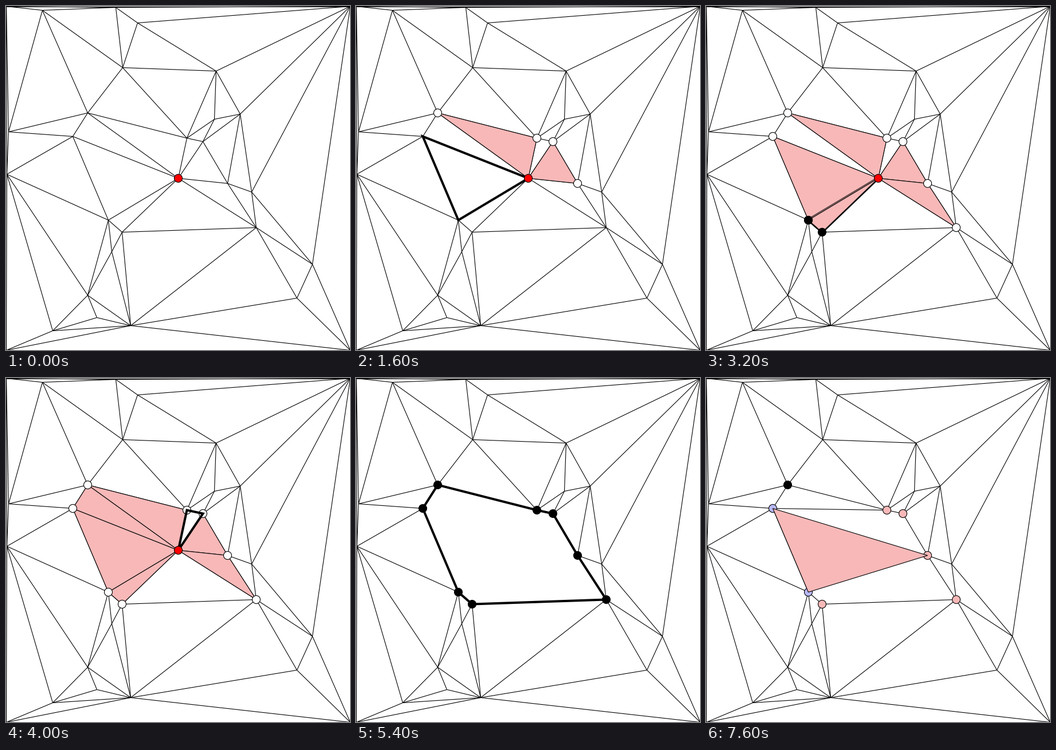
A matplotlib script that plays this animation: 600x600 px, repeating every 8000 ms.

```python
import numpy as np
import matplotlib.pyplot as plt
from matplotlib.animation import FuncAnimation
from matplotlib.collections import LineCollection
from matplotlib.patches import Circle, Polygon

SIZE, DPI, STEP, FRAMES = 600, 100, 200, 40
PX = 72 / DPI
PINK, BLUE = "#f8b8b8", "#b8b8f8"

# Upper-case letters: the rim of the star around O; w, x, y, z: stage corners.
P = dict(
    w=(0, 0), x=(600, 0), y=(600, 600), z=(0, 600),
    O=(300, 300), A=(142, 186), B=(315, 230), D=(343, 236), E=(386, 309),
    R=(436, 386), T=(202, 394), S=(178, 373), C=(116, 227),
    a=(63, 7), b=(191, 2), c=(229, 29), d=(203, 107), e=(366, 113),
    f=(363, 197), g=(408, 188), h=(428, 324), i=(534, 450), j=(507, 509),
    k=(217, 557), l=(158, 543), m=(81, 566), n=(142, 504), o=(184, 428),
    p=(4, 219), q=(1, 293),
)
P = {name: np.array(xy) + 0.5 for name, xy in P.items()}

MESH = """wa ab wb bx wx bc bd cd cx ce de ad aA ap dA dB eB ef eg ex fg fB fD
gD gE gh gx hx hE hR hi ix iR ij iy jR jk jy ky kR kT ko kn kl km kz ln lm mn mz
mq nq nS no oT oS qS qC qp pA pC qz wp wq""".split()
RIM = "ABDERTSC"
RIM_EDGES = [u + v for u, v in zip(RIM, RIM[1:] + RIM[0])]
STAR = ["AB", "DE", "CS", "ER", "ST", "CA", "BD", "TR"]

fig = plt.figure(figsize=(SIZE / DPI, SIZE / DPI), dpi=DPI, facecolor="white")
ax = fig.add_axes([0, 0, 1, 1])
ax.set(xlim=(0, SIZE), ylim=(SIZE, 0))
ax.axis("off")
live = []


def put(artist):
    artist.set_zorder(10 + len(live))
    live.append(artist)
    ax.add_artist(artist)


def pts(names):
    return np.array([P[v] for v in names])


def lines(edges, width=1.1):
    return LineCollection([pts(e) for e in edges], colors="black",
                          linewidths=width * PX)


def shape(names, fill=None, width=1.1):
    put(Polygon(pts(names), closed=True, facecolor=fill or "none",
                edgecolor="black", linewidth=width * PX, joinstyle="miter"))


def dots(names, color):
    for v in names:
        put(Circle(P[v], 7, facecolor=color, edgecolor="black",
                   linewidth=1.1 * PX))


def double_edge(v, inner):
    """Second thin line beside spoke v, on the side away from inner."""
    ray = P[v] - P["O"]
    normal = np.array([-ray[1], ray[0]]) / np.hypot(*ray)
    if normal @ (P[inner] - P["O"]) > 0:
        normal = -normal
    put(LineCollection([pts(v + "O") + 2 * normal], colors="black",
                       linewidths=PX))


def visit(step):
    """Collect the star: outline a triangle, mark its ends, then fill it."""
    n, phase = divmod(step, 3)
    done = STAR[:n]
    seen = set("".join(done))
    now = STAR[n] if n < len(STAR) else ""
    if phase == 2:
        shape(now + "O", width=4)
    for pair in done:
        shape(pair + "O", PINK)
    if phase == 2:
        shape(now + "O", PINK)
        for v, other in (now, now[::-1]):
            if v in seen:
                double_edge(v, other)
    dots(sorted(seen), "white")
    if now and phase < 2:
        shape(now + "O", width=4)
    if now and phase > 0:
        dots(now, "black")


def hole(ring):
    shape(ring, width=4)
    dots(RIM, "black")


def test_ear(ring, base, tip):
    dots(set(RIM) - set(ring), "black")
    for v in ring:
        dots(v, BLUE if v in base else PINK)
    shape(base + tip, PINK)


def draw(frame):
    for artist in live:
        artist.remove()
    live.clear()
    t = frame * STEP
    spokes.set_visible(t < 5400)
    cut.set_visible(t >= 6400)
    rest = RIM[1:]
    if t < 5400:
        if t >= 400:
            visit((t - 400) // STEP)
        dots("O", "red")
    elif t < 5800:
        hole(RIM)
    elif t < 6400:
        test_ear(RIM, "BA", "C")
    elif t < 6800:
        hole(rest)
    else:
        test_ear(rest, "CS", "TRE"[(t - 6800) // 400])
    return live


ax.add_collection(lines(MESH + RIM_EDGES), autolim=False)
spokes = ax.add_collection(lines([v + "O" for v in RIM]), autolim=False)
cut = ax.add_collection(lines(["CB"]), autolim=False)

anim = FuncAnimation(fig, draw, frames=FRAMES, init_func=lambda: draw(0),
                     interval=STEP, repeat=True, repeat_delay=0, blit=False)
plt.show()
```
